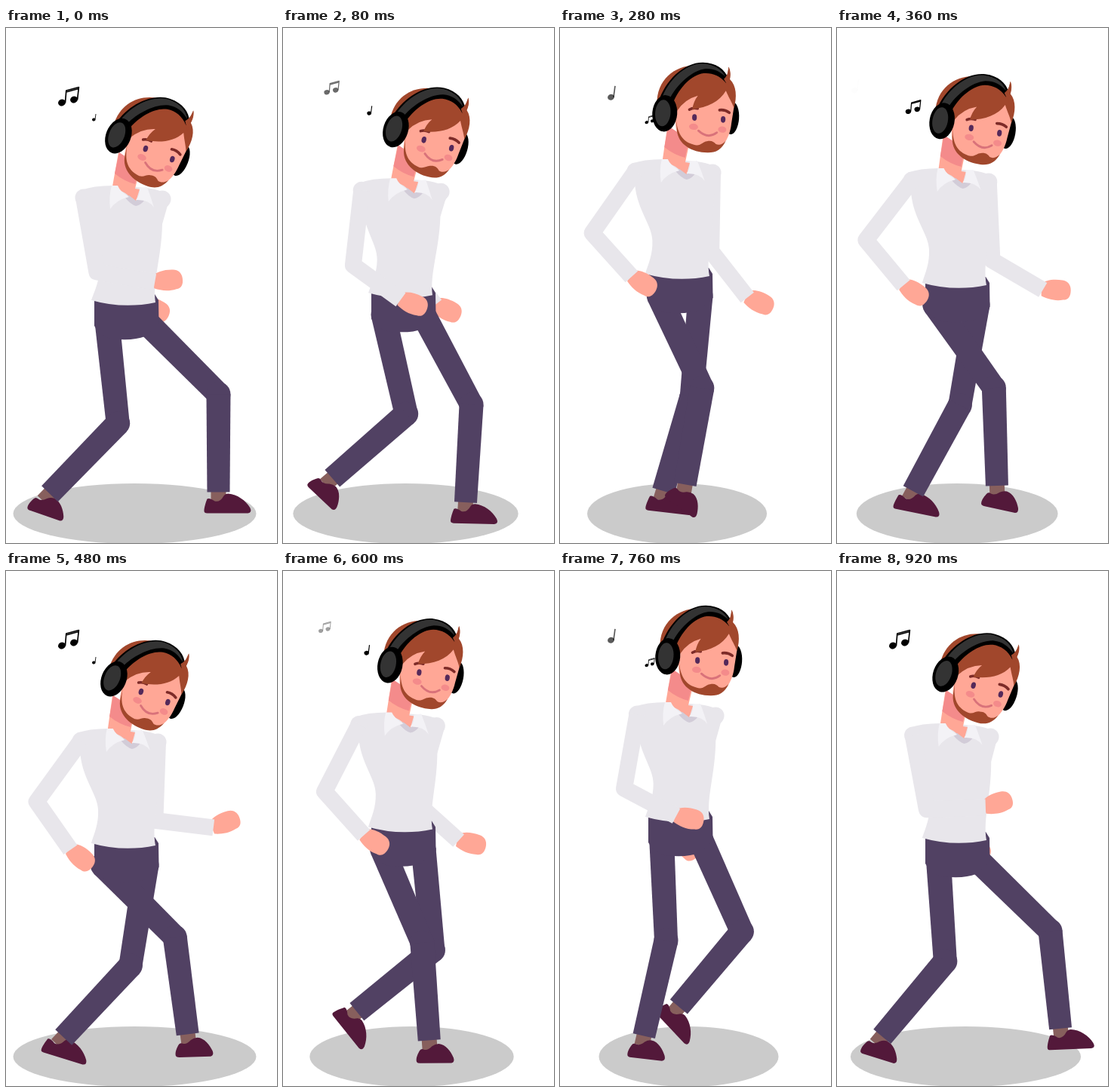
An HTML page with a canvas for the animation above (960 ms loop, 359x683 px).

```html
<!DOCTYPE html>
<html lang="en">
<head>
<meta charset="utf-8">
<title>Walking to music</title>
<style>
  html, body { margin: 0; width: 100%; height: 100%; overflow: hidden; background: #fff; }
  canvas { display: block; width: 359px; height: 683px; }
</style>
</head>
<body>
<canvas id="stage"></canvas>
<script>
const W = 359, H = 683, LOOP = 960, HALF = 480, STEP = 40;
const THIGH = 135, SHIN = 130, FOREARM = 78;
const canvas = document.getElementById('stage');
const ctx = canvas.getContext('2d');
const dpr = window.devicePixelRatio || 1;
canvas.width = W * dpr;
canvas.height = H * dpr;

const C = {
  skin: '#ffa796', flush: '#f48b8b', shirt: '#e8e6eb', collar: '#f3f2f6', fold: '#d2ccd8',
  pants: '#514163', shoe: '#53193a', ankle: '#875f5d', hair: '#a1472c', black: '#000',
  pad: '#333', eye: '#54295a', brow: '#7d2b28', mouth: '#d9727a', shadow: '#cbcbcb'
};

const rad = deg => deg * Math.PI / 180;
const clamp = v => Math.max(0, Math.min(1, v));

// Smooth periodic curve through a few {time: value} key points.
function keys(points, period = LOOP) {
  const times = Object.keys(points).map(Number), n = times.length;
  const at = i => times[(i + n) % n] + period * Math.floor(i / n);
  const val = i => points[times[(i + n) % n]];
  const rate = i => (val(i + 1) - val(i)) / (at(i + 1) - at(i));
  const slope = i => {
    const h0 = at(i) - at(i - 1), h1 = at(i + 1) - at(i);
    return (h1 * rate(i - 1) + h0 * rate(i)) / (h0 + h1);
  };
  return time => {
    const t = time % period;
    let i = n - 1;
    while (times[i] > t) i--;
    const h = at(i + 1) - at(i), u = (t - at(i)) / h, v = 1 - u;
    return v * v * (1 + 2 * u) * val(i) + u * v * v * h * slope(i)
      + u * u * (3 - 2 * u) * val(i + 1) - u * u * v * h * slope(i + 1);
  };
}

const bob = keys({ 0: 35, 120: 13.5, 160: 0, 280: 0, 440: 28 }, HALF);
const sway = keys({ 0: 0, 160: 0, 280: -5, 480: -6, 760: -1, 920: -4 });

// Limb angles in degrees, measured from straight down towards the right.
const nearLeg = {
  thigh: keys({ 0: 6, 160: 20, 280: 25, 480: 45, 600: 23, 760: 2.5 }),
  shin: keys({ 0: -44, 160: -44, 280: -10, 480: 7.5, 760: -13, 920: -40 }),
  lift: 0,
  shoe: 'M-14 4 C-17 9 -19 14 -18 18 Q-17 20 -13 20 L28 21 Q33 20 31 14 C28 6 21 -4 12 -5 Q7 -5 3 -2 Q-3 4 -8 2 Q-12 0 -14 4Z'
};
const farLeg = {
  thigh: keys({ 0: 45, 160: 8, 280: -5, 480: -9, 600: 5.5, 760: 24 }),
  shin: keys({ 0: 0, 160: -4, 480: -43, 600: -51, 760: -40, 920: 6 }),
  lift: HALF,
  shoe: 'M-15 -1 C-17 4 -19 11 -19 15 Q-19 18 -15 18 L39 18 Q45 17 42 11 C36 1 25 -7 13 -8 Q9 -8 7 -5 Q2 4 -5 2 Q-12 -3 -15 -1Z'
};
const nearArm = {
  upper: keys({ 0: 10, 160: -25.5, 280: -35, 480: -36, 760: -10 }),
  fore: keys({ 0: 80, 160: 36, 280: 42, 480: 35, 760: 62, 920: 92 }),
  len: 100, bend: -18
};
const farArm = {
  upper: keys({ 0: -43, 160: -18, 280: -1, 480: -2, 600: -16, 760: -37 }),
  fore: keys({ 0: 36, 280: 38, 480: 83, 600: 48, 760: 10 }),
  len: 104, bend: -30
};

function fill(color, d) {
  ctx.fillStyle = color;
  ctx.fill(new Path2D(d));
}
function line(color, width, d, cap = 'round') {
  ctx.strokeStyle = color;
  ctx.lineWidth = width;
  ctx.lineCap = cap;
  ctx.lineJoin = 'round';
  ctx.stroke(new Path2D(d));
}
function oval(color, x, y, rx, ry = rx, turn = 0) {
  ctx.fillStyle = color;
  ctx.beginPath();
  ctx.ellipse(x, y, rx, ry, rad(turn), 0, 2 * Math.PI);
  ctx.fill();
}
function group(x, y, deg, draw) {
  ctx.save();
  ctx.translate(x, y);
  ctx.rotate(rad(deg));
  draw();
  ctx.restore();
}
function reach(x, y, deg, len) {
  return [x + len * Math.sin(rad(deg)), y + len * Math.cos(rad(deg))];
}
// Draws a tapered bone hanging from its joint.
function bone(x, y, deg, len, r0, r1) {
  oval(C.pants, x, y, r0);
  group(x, y, -deg, () => fill(C.pants, `M${-r0} 0 L${r0} 0 L${r1} ${len} L${-r1} ${len}Z`));
}

function drawLeg(leg, hx, hy, t) {
  const thigh = leg.thigh(t), shin = leg.shin(t);
  const [kx, ky] = reach(hx, hy, thigh, THIGH);
  const [jx, jy] = reach(kx, ky, shin, SHIN + 10);
  const swing = clamp((t - leg.lift + LOOP) % LOOP / 400);
  const foot = -0.4 * shin + 38 * Math.sin(Math.PI * swing);
  group(jx, jy, -shin, () => line(C.ankle, 20, 'M0 -14 V3', 'butt'));
  group(jx, jy, foot, () => fill(C.shoe, leg.shoe));
  bone(hx, hy, thigh, THIGH, 16.5, 15.5);
  bone(kx, ky, shin, SHIN, 16, 15);
}

function drawArm(arm, sx, sy, t) {
  const fore = arm.fore(t);
  const [ex, ey] = reach(sx, sy, arm.upper(t), arm.len);
  const [wx, wy] = reach(ex, ey, fore, FOREARM);
  group(wx, wy, 90 - fore + arm.bend, () =>
    fill(C.skin, 'M-2 -8 C3 -13 14 -15 26 -13 C33 -12 37 -7 37 0 C37 8 34 13 27 13 C16 15 6 12 -2 8Z'));
  oval(C.shirt, sx, sy, 11.5);
  line(C.shirt, 22, `M${sx} ${sy} L${ex} ${ey} L${wx} ${wy}`, 'butt');
}

function drawTorso(y, s) {
  ctx.save();
  ctx.translate(0, y);
  fill(C.pants, 'M117 322 L117 360 Q128 379 150 378 Q172 379 184 374 L202.5 358 L202 326 L197 318Z');
  // Lean the chest while the hem stays put.
  ctx.transform(1, 0, -s / 150, 1, s * 2.2, 0);
  fill(C.shirt, `M142 174 Q115 174 100 180 L104 215 C108 245 124 262 124 282 C124 300 118 312 113 326
    Q155 338 198 329 C194 300 206 270 207 225 L217 190 Q213 181 186 177Z`);
  fill(C.skin, 'M149 130 L141 175 L158 184 L172 195 L177 179 L171 178 L178 150Z');
  fill(C.flush, 'M150 130 L144 158 Q156 168 171 172 L177 148Z');
  fill(C.fold, 'M157 189 L163 187 L172 194 L184 187 L190 195 L183 194 Q178 200 172 201 Q165 199 157 189Z');
  fill(C.collar, 'M140 174 L148 174 Q151 182 163 189 Q146 193 138 205 Q136 188 140 174Z');
  fill(C.collar, 'M177 177 L187 176 Q192 190 196 203 Q189 192 172 193 Q178 187 177 177Z');
  ctx.restore();
}

function drawHead() {
  oval(C.black, 232, 119, 10, 21, 3);
  fill(C.hair, 'M133 104 C131 70 158 51 186 52 L200 100 L160 118Z');
  fill(C.skin, 'M152 92 L158 128 C160 152 182 164 202 163 C218 162 230 148 232 126 L236 98 L215 70 L175 72Z');
  fill(C.hair, `M158 117 C160 138 166 150 182 154 C192 157 194 150 200 149.5 C206 148 209 150 212 153
    C217 155 222 152 225 148 C220 160 212 164 201 164 C180 164 162 154 160 136Z`);
  oval(C.flush, 182, 131, 6, 4, 4);
  oval(C.flush, 220, 134, 5.5, 4, 4);
  oval(C.eye, 183, 119, 3.1, 4.2);
  oval(C.eye, 221, 121, 3.1, 4.2);
  line(C.brow, 3.4, 'M176 109 Q181 106 187 107.5');
  line(C.brow, 3.6, 'M216 109 Q223 108 229 112');
  line(C.mouth, 2.8, 'M188.5 136 Q201 147 213 138');
  fill(C.hair, `M152 106 C155 86 176 62 196 59 C212 58 220 64 225 70 C226 64 226 59 227 53
    C230 58 230 64 229 69 C238 77 239 92 235 106 C232 98 228 93 224 84
    C216 98 200 106 180 108.5 Q181 99 187 91 Q169 96 159 112Z`);
  fill(C.black, `M135 100 C143 72 168 48 193 48 C210 48 222 56 227 68 L224 74
    C215 64 205 61 194 62 C178 64 162 82 155 99Z`);
  fill(C.pad, `M139 96 C146 74 168 50 192 49.5 C208 50 218 56 223 66
    C214 58 205 55 194 56.5 C176 60 157 80 150 95Z`);
  fill(C.hair, 'M221 69 Q227 63 227 53 Q231 62 228 72 L228 80Z');
  oval(C.black, 143.5, 114.5, 16.5, 23.5, 4);
  oval(C.pad, 141, 114, 10.2, 17, 4);
}

function drawNote(x, y, size, alpha, heads, r, stems) {
  ctx.save();
  ctx.globalAlpha = clamp(alpha);
  ctx.translate(x, y);
  ctx.scale(size, size);
  for (const [hx, hy] of heads) oval(C.black, hx, hy, r, r * 0.88, -15);
  line(C.black, 1.7, stems, 'butt');
  ctx.restore();
}
// Grows on its way up, rests for a moment, then shrinks and fades.
function drawPair(t) {
  const d = 45 * (1 - clamp(t / 200)) - 30 * clamp((t - 240) / 130);
  drawNote(83 + d, 91 + 0.7 * d + 0.004 * d * d, 1 - 0.0148 * Math.abs(d), (432 - t) / 192,
    [[-9, 8], [7, 4]], 5, 'M-4.5 8 L-3.2 -8 L13.4 -12.5 L11.6 4 M-3.5 -6 L13 -10.5');
}
function drawSolo(t) {
  drawNote(117 - 48 * (t / 280) ** 2.6, 119 - 0.115 * t, Math.min(1, 0.5 + t / 570), (361 - t) / 125,
    [[-1.5, 5]], 4.5, 'M2 5 L4 -10');
}

function render(t) {
  const y = bob(t), s = sway(t), hipY = 355 + y;
  const drift = 16 * Math.max(0, Math.sin(2 * Math.PI * t / LOOP));
  ctx.setTransform(dpr, 0, 0, dpr, 0, 0);
  ctx.fillStyle = '#fff';
  ctx.fillRect(0, 0, W, H);
  oval(C.shadow, 170.5 - drift, 644, 119 + 1.2 * y, 40);
  drawPair((t + HALF / 2) % HALF);
  drawSolo(t % HALF);
  drawArm(farArm, 207 + s, 192 + y, t);
  drawLeg(farLeg, 186, hipY, t);
  drawLeg(nearLeg, 135 - 0.15 * nearLeg.thigh(t), hipY, t);
  drawTorso(y, s);
  group(163 + s, 127.5 + y, 1 + y / 2, () => {
    ctx.scale(1, 1.03);
    ctx.translate(-163, -128);
    drawHead();
  });
  drawArm(nearArm, 103 + s * 0.6, 190 + y, t);
}

function tick() {
  render(Math.floor(performance.now() % LOOP / STEP) * STEP);
  requestAnimationFrame(tick);
}
tick();
</script>
</body>
</html>
```
